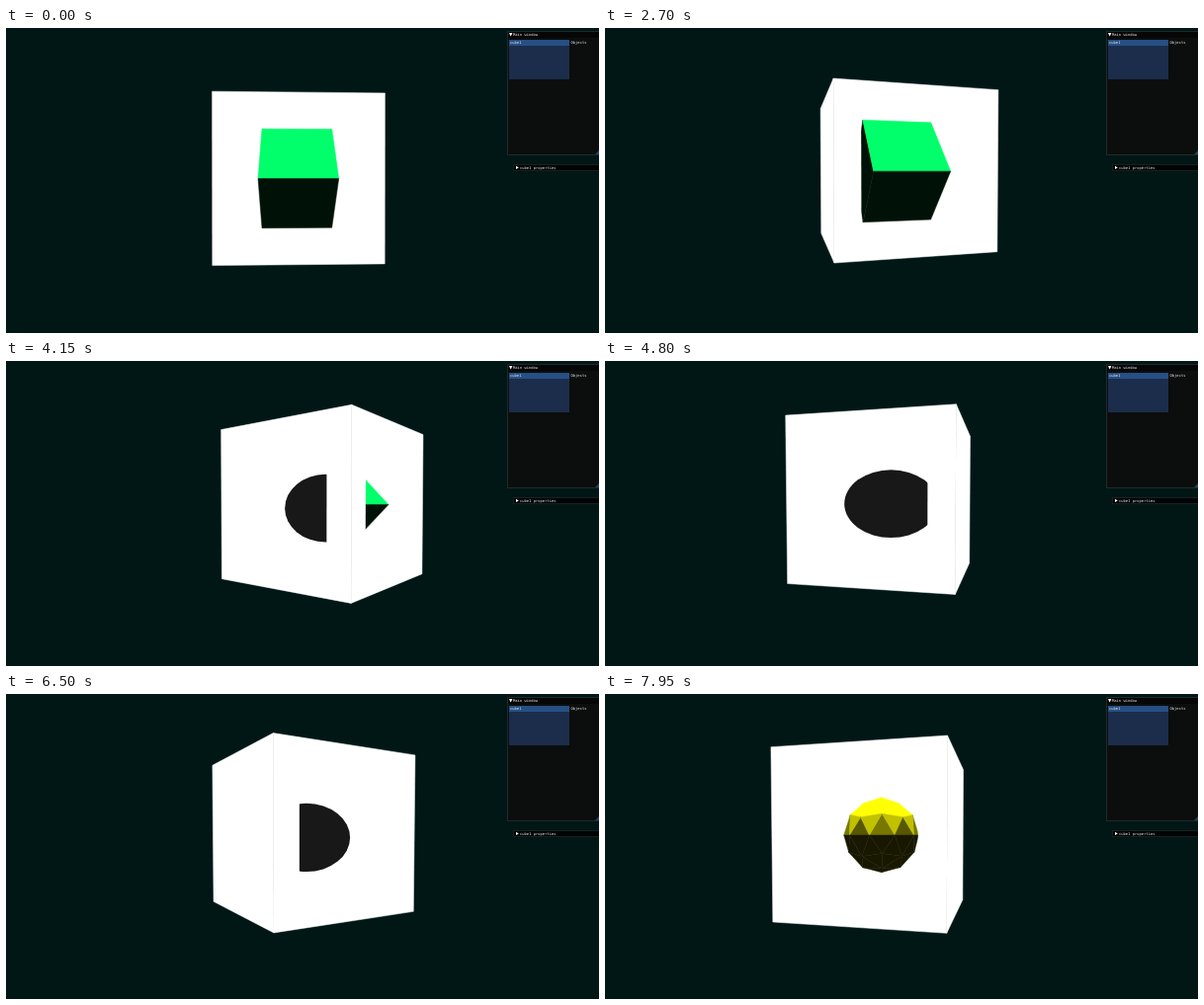
An HTML page with a canvas that plays this animation: 600x309 px, repeating every 8000 ms.

```html
<!DOCTYPE html>
<html lang="en">
<head>
<meta charset="utf-8">
<title>Portal cube</title>
<style>
html, body { margin: 0; width: 100%; height: 100%; overflow: hidden; background: #001716; }
canvas { display: block; }
</style>
</head>
<body>
<canvas id="stage" width="600" height="309"></canvas>
<script>
const ctx = document.getElementById('stage').getContext('2d');
const W = 600, H = 309, LOOP = 8000, STEP = 50;
const FOCAL = 373, RAD = Math.PI / 180;

// time, orbit azimuth, cube centre x, horizon y, distance
const KEYS = [
  [0, 1.55, 294.5, 152.5, 5.27],
  [2175, 1.55, 294.5, 152.5, 5.27],
  [2370, 6.6, 325.5, 151.5, 5.26],
  [2950, 22.6, 277, 141, 5.21],
  [3250, 30.7, 281, 140, 5.19],
  [3450, 36.2, 283.7, 141, 5.185],
  [3520, 38.1, 286, 143, 5.18],
  [3800, 46, 257, 149.5, 5.15],
  [4150, 55.6, 323.2, 145.5, 5.115],
  [4230, 57.9, 329, 144, 5.11],
  [4650, 69.6, 286, 141, 5.1],
  [5100, 81.9, 299, 141, 5.09],
  [5500, 92.9, 294.1, 143, 5.076],
  [5900, 104.2, 306, 141.5, 5.07],
  [6350, 117.2, 310, 141, 5.06],
  [6500, 121.4, 304.3, 141.7, 5.063],
  [6800, 129.9, 287, 142, 5.03],
  [7200, 141.4, 275, 141.5, 5],
  [7300, 144.3, 280, 142, 4.99],
  [7750, 157.1, 271.5, 143, 4.95],
  [7950, 162.9, 279.8, 143, 4.94]
];

// monotone cubic interpolation of one column
const rate = (i, c) => (KEYS[i + 1][c] - KEYS[i][c]) / (KEYS[i + 1][0] - KEYS[i][0]);
function tangent(i, c) {
  if (i === 0) return rate(0, c);
  if (i === KEYS.length - 1) return rate(i - 1, c);
  const a = rate(i - 1, c), b = rate(i, c);
  return a * b <= 0 ? 0 : 2 * a * b / (a + b);
}
function sample(t, c) {
  const last = KEYS.length - 1;
  if (t >= KEYS[last][0]) return KEYS[last][c];
  let i = 0;
  while (t >= KEYS[i + 1][0]) i++;
  const span = KEYS[i + 1][0] - KEYS[i][0], u = (t - KEYS[i][0]) / span;
  const v = 1 - u;
  return KEYS[i][c] * v * v * (1 + 2 * u) + KEYS[i + 1][c] * u * u * (3 - 2 * u) +
    span * u * v * (v * tangent(i, c) - u * tangent(i + 1, c));
}

// geometry helpers
const polar = (deg, r, y) => [-Math.sin(deg * RAD) * r, y, Math.cos(deg * RAD) * r];
const dot = (a, b) => a[0] * b[0] + a[1] * b[1] + a[2] * b[2];
const sub = (a, b) => a.map((v, i) => v - b[i]);
const cross = (a, b) => [
  a[1] * b[2] - a[2] * b[1], a[2] * b[0] - a[0] * b[2], a[0] * b[1] - a[1] * b[0]
];

// a polygon wound outwards from the origin, with the height of its normal
function makeFace(pts) {
  let n = cross(sub(pts[1], pts[0]), sub(pts[2], pts[0]));
  if (dot(n, pts[0]) < 0) {
    pts = pts.slice().reverse();
    n = n.map(v => -v);
  }
  return { pts, up: n[1] / Math.hypot(...n) };
}

function wall(deg, half) {
  const a = deg * RAD, c = Math.cos(a), s = Math.sin(a);
  return [[-half, half], [half, half], [half, -half], [-half, -half]]
    .map(([x, y]) => [x * c - s, y, x * s + c]);
}

function makeBox() {
  const q = Math.SQRT1_2, ring = [[0, q], [q, 0], [0, -q], [-q, 0]];
  const end = x => ring.map(([y, z]) => [x, y, z]);
  const l = end(-0.5), r = end(0.5), faces = [makeFace(l), makeFace(r)];
  for (let i = 0; i < 4; i++) {
    const j = (i + 1) % 4;
    faces.push(makeFace([l[i], r[i], r[j], l[j]]));
  }
  return faces;
}

function makeBall(radius) {
  const faces = [];
  for (const side of [1, -1]) {
    const turn = side > 0 ? 126 : 162;
    const at = (deg, r, y) => polar(turn + deg, r * radius, side * y * radius);
    const pole = at(0, 0, 1);
    const top = k => at(72 * k, 0.5257, 0.8507);
    const mid = j => j % 2 ? at(36 * j, 0.8507, 0.5257) : at(36 * j, 0.8944, 0.4472);
    const rim = j => at(36 * j + 18, 1, 0);
    const add = (...pts) => faces.push(makeFace(pts));
    for (let k = 0; k < 5; k++) {
      add(pole, top(k), top(k + 1));
      add(top(k), mid(2 * k + 1), top(k + 1));
      add(top(k), mid(2 * k), mid(2 * k + 1));
      add(top(k + 1), mid(2 * k + 1), mid(2 * k + 2));
    }
    for (let j = 0; j < 10; j++) {
      add(mid(j + 1), rim(j), rim(j + 1));
      add(rim(j), mid(j), mid(j + 1));
    }
  }
  return faces;
}

const box = makeBox(), ball = makeBall(0.5);

// camera: heading follows from the orbit angle and the cube's place on screen
function makeCamera(t) {
  const [azimuth, cx, horizon, dist] = [1, 2, 3, 4].map(c => sample(t, c));
  const side = (cx - W / 2) / FOCAL;
  const heading = azimuth * RAD - Math.atan(side);
  const pitch = Math.atan((H / 2 - horizon) / FOCAL);
  const ch = Math.cos(heading), sh = Math.sin(heading);
  const cp = Math.cos(pitch), sp = Math.sin(pitch);
  return {
    heading, dist,
    project([x, y, z]) {
      const px = side * dist + x * ch + z * sh;
      const d = dist + x * sh - z * ch;
      const k = FOCAL / (d * cp - y * sp);
      return [W / 2 + px * k, H / 2 - (y * cp + d * sp) * k];
    }
  };
}

function signedArea(p) {
  return p.reduce((sum, [x, y], i) => {
    const [u, v] = p[(i + 1) % p.length];
    return sum + x * v - u * y;
  }, 0);
}

function trace(p) {
  ctx.beginPath();
  p.forEach(([x, y]) => ctx.lineTo(x, y));
  ctx.closePath();
}

function drawSolid(cam, faces, rgb, ambient) {
  ctx.lineWidth = 0.5;
  for (const { pts, up } of faces) {
    const p = pts.map(cam.project);
    if (signedArea(p) >= 0) continue;
    const light = Math.min(1, ambient + 2 * Math.max(0, up));
    ctx.fillStyle = ctx.strokeStyle = `rgb(${rgb.map(v => Math.round(v * light))})`;
    trace(p);
    ctx.fill();
    ctx.stroke();
  }
}

function drawEgg(cam) {
  const [x, y] = cam.project([0, -0.05, 0]);
  const k = FOCAL / cam.dist;
  const wide = Math.hypot(0.66 * Math.sin(cam.heading), 0.35 * Math.cos(cam.heading));
  ctx.fillStyle = '#181818';
  ctx.beginPath();
  ctx.ellipse(x, y, wide * k, 0.47 * k, 0, 0, 2 * Math.PI);
  ctx.fill();
}

const portals = [
  [0, cam => drawSolid(cam, box, [0, 255, 106], 0.07)],
  [90, drawEgg],
  [180, cam => drawSolid(cam, ball, [255, 255, 0], 0.095)],
  [270, () => {}]
];

function drawCube(cam) {
  const open = portals.filter(([deg]) =>
    signedArea(makeFace(wall(deg, 1)).pts.map(cam.project)) < 0);
  ctx.fillStyle = ctx.strokeStyle = '#fff';
  ctx.lineWidth = 0.5;
  for (const [deg] of open) {
    trace(wall(deg, 1).map(cam.project));
    ctx.fill();
    ctx.stroke();
  }
  for (const [deg, content] of open) {
    ctx.save();
    trace(wall(deg, 0.7).map(cam.project));
    ctx.clip();
    content(cam);
    ctx.restore();
  }
}

// interface
function rect(color, x, y, w, h) {
  ctx.fillStyle = color;
  ctx.fillRect(x, y, w, h);
}
function label(text, x, y) {
  ctx.fillStyle = '#e8e8e8';
  ctx.fillText(text, x, y);
}
function shape(color, ...p) {
  ctx.fillStyle = color;
  trace(p);
  ctx.fill();
}

function drawPanels() {
  ctx.font = '3.8px "DejaVu Sans Mono", monospace';
  ctx.textBaseline = 'middle';
  rect('#20292a', 507, 3, 93, 126);
  rect('#0b0e0d', 508, 4, 92, 124);
  rect('#060606', 508, 4, 92, 6);
  shape('#fff', [509, 5], [512.4, 5], [510.7, 8.5]);
  label('Main window', 513, 7);
  rect('#1b2d4b', 509, 12, 61, 40);
  rect('#264f85', 509, 12, 61, 6);
  label('cube1', 510, 15.2);
  label('Objects', 571.5, 15.2);
  shape('#24415f', [600, 124], [600, 128], [596, 128]);

  rect('#172021', 513, 138, 87, 7);
  rect('#020303', 514, 139, 86, 5);
  shape('#fff', [516, 139.8], [518.8, 141.4], [516, 143]);
  label('cube1 properties', 520, 141.6);
}

function frame(now) {
  const t = Math.floor(now % LOOP / STEP) * STEP;
  rect('#001716', 0, 0, W, H);
  drawCube(makeCamera(t));
  drawPanels();
  requestAnimationFrame(frame);
}
frame(0);
</script>
</body>
</html>
```
